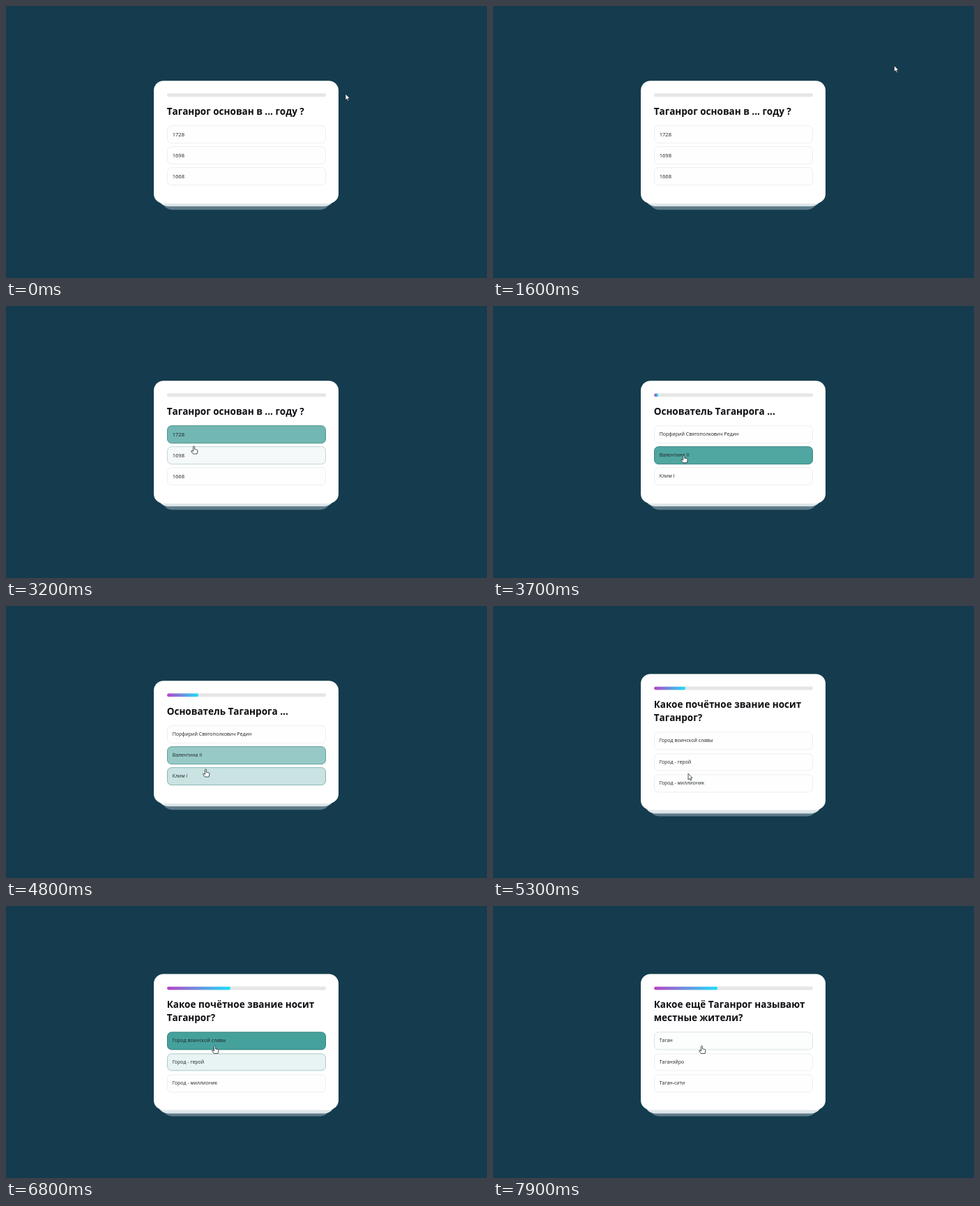
Recreate the animation shown at these times as an HTML page. Size 690 by 390 pixels, loop 8 s.

```html
<!DOCTYPE html>
<html lang="ru">
<head>
<meta charset="utf-8">
<title>Викторина</title>
<style>
  html, body { margin: 0; width: 100%; height: 100%; overflow: hidden; background: #143c4e; }
  body { position: relative; font-family: "Open Sans", "Noto Sans", sans-serif; }
  .stage { position: absolute; left: 0; top: 0; width: 690px; height: 390px; overflow: hidden; }
  .card { position: absolute; left: 212.2px; width: 265px; top: 195px; transform: translateY(-50%); }
  .layer { position: absolute; border-radius: 14px; }
  .far { inset: 50% 12px -9.2px; background: #5d7a89; }
  .near { inset: 50% 6px -4.8px; background: #dee6e9; }
  .front { position: relative; box-sizing: border-box; padding: 18.4px 18.5px 21.2px; border-radius: 14px; background: #fff; }
  .track { height: 4.6px; border-radius: 2.3px; background: #e6e6e6; overflow: hidden; }
  .fill { height: 100%; border-radius: 2.3px; background: linear-gradient(90deg, #b942c8, #1cdffa); }
  h1 { margin: 11.6px 0 9.7px; font-size: 13.54px; line-height: 19.6px; font-weight: 700; color: #0d0d12; white-space: pre; }
  .option { box-sizing: border-box; height: 25.8px; margin-bottom: 4.4px; padding-left: 7px; border: 0.8px solid; border-radius: 6.5px;
            line-height: 24.2px; color: #1e2124; white-space: pre; }
  svg { position: absolute; left: 0; top: 0; overflow: visible; }
  svg path { fill: #fff; stroke: #1c2b33; stroke-width: .8; stroke-linejoin: round; }
</style>
</head>
<body>
<div class="stage">
  <div class="card">
    <div class="layer far"></div>
    <div class="layer near"></div>
    <div class="front">
      <div class="track"><div class="fill"></div></div>
      <h1></h1>
      <div class="option"></div>
      <div class="option"></div>
      <div class="option"></div>
    </div>
  </div>
  <svg width="1" height="1">
    <path id="arrow" d="M0 0V8.8L2 7.1L3.4 10L4.8 9.4L3.5 6.6L6 6.3Z"/>
    <path id="hand" d="M-1 1a1 1 0 0 1 2 0V4.4L4.4 5.1Q5.6 5.5 5.4 6.8L4.6 11H-1.2L-3.8 7.4Q-4 6 -2.6 6.4L-1 7.5Z"/>
  </svg>
</div>
<script>
const LOOP = 8000, STEP = 100, FADE = 500, FILL_TIME = 1000;

const questions = [
  { from: 0, size: 7.6, title: "Таганрог основан в ... году ?", options: ["1728", "1698", "1668"] },
  { from: 3440, size: 7, title: "Основатель Таганрога ...", options: ["Порфирий Святополкович Редин", "Валентина II", "Клим I"] },
  { from: 5290, size: 7, title: "Какое почётное звание носит\nТаганрог?", options: ["Город воинской славы", "Город - герой", "Город - миллионик"] },
  { from: 7890, size: 7, title: "Какое ещё Таганрог называют\nместные жители?", options: ["Таган", "Таганэйро", "Таган-сити"] }
];

// question, option, pointer enters, pointer leaves
const hovers = [
  [0, 0, 2100, 3090], [0, 1, 3170, 3440],
  [1, 1, 3440, 4650], [1, 2, 4710, 5290],
  [2, 1, 5850, 6490], [2, 0, 6510, 7890],
  [3, 0, 7890, 8000]
];

// time, x, y of the pointer tip
const path = [
  [120, 487, 126], [500, 338, 145], [1000, 583, 79], [1100, 583, 83], [1520, 583, 83],
  [2400, 265.5, 189], [2950, 265.5, 189], [3450, 273.5, 213], [4500, 275, 218],
  [4800, 286.5, 234], [5100, 280, 240], [5500, 280, 240.5], [5850, 287, 236],
  [6400, 292, 218], [6500, 293.5, 208.5], [6800, 299.5, 200.5]
];

const $ = s => document.querySelector(s);
const title = $("h1"), fill = $(".fill"), svg = $("svg"), arrow = $("#arrow"), hand = $("#hand");
const options = [...document.querySelectorAll(".option")];

const clamp = v => Math.min(1, Math.max(0, v));
const smooth = v => v * v * (3 - 2 * v);
const mix = (a, b, k) => a + (b - a) * k;
const mixColor = (a, b, k) => `rgb(${a.map((v, i) => Math.round(mix(v, b[i], k)))})`;

function bezier(x1, y1, x2, y2) {
  const at = (a, b, s) => 3 * a * s * (1 - s) ** 2 + 3 * b * s * s * (1 - s) + s ** 3;
  return v => {
    const x = clamp(v);
    let lo = 0, hi = 1;
    for (let i = 0; i < 20; i++) {
      const mid = (lo + hi) / 2;
      if (at(x1, x2, mid) < x) lo = mid; else hi = mid;
    }
    return at(y1, y2, (lo + hi) / 2);
  };
}
const ease = bezier(.25, .1, .25, 1);
const easeInOut = bezier(.42, 0, .58, 1);

function pointerAt(t) {
  const next = path.findIndex(p => p[0] > t);
  if (next === 0) return path[0].slice(1);
  if (next < 0) return path[path.length - 1].slice(1);
  const [t0, x0, y0] = path[next - 1], [t1, x1, y1] = path[next];
  const k = smooth((t - t0) / (t1 - t0));
  return [mix(x0, x1, k), mix(y0, y1, k)];
}

function tint(question, option, t) {
  const hover = hovers.find(h => h[0] === question && h[1] === option);
  if (!hover) return 0;
  const [, , enter, leave] = hover;
  return ease((Math.min(t, leave) - enter) / FADE) * (1 - ease((t - leave) / FADE));
}

function progress(index, t) {
  if (index === 0) return 0;
  return 20 * (index - 1 + easeInOut((t - questions[index].from) / FILL_TIME));
}

let shown = -1;
function showQuestion(index) {
  if (index === shown) return;
  shown = index;
  const q = questions[index];
  title.textContent = q.title;
  options.forEach((el, i) => {
    el.textContent = q.options[i];
    el.style.fontSize = q.size + "px";
  });
}

function render(t) {
  const index = questions.filter(q => q.from <= t).length - 1;
  showQuestion(index);
  fill.style.width = progress(index, t) + "%";
  options.forEach((el, i) => {
    const k = tint(index, i, t);
    el.style.backgroundColor = mixColor([254, 254, 254], [42, 147, 141], k);
    el.style.borderColor = mixColor([236, 238, 238], [36, 122, 118], Math.sqrt(k));
  });
  const [x, y] = pointerAt(t);
  const pointing = hovers.some(h => t >= h[2] && t < h[3]);
  svg.style.transform = `translate(${x}px, ${y}px)`;
  hand.style.display = pointing ? "" : "none";
  arrow.style.display = pointing ? "none" : "";
}

const start = performance.now();
function tick() {
  const t = (performance.now() - start) % LOOP;
  render(Math.floor(t / STEP) * STEP);
  requestAnimationFrame(tick);
}
tick();
</script>
</body>
</html>
```
